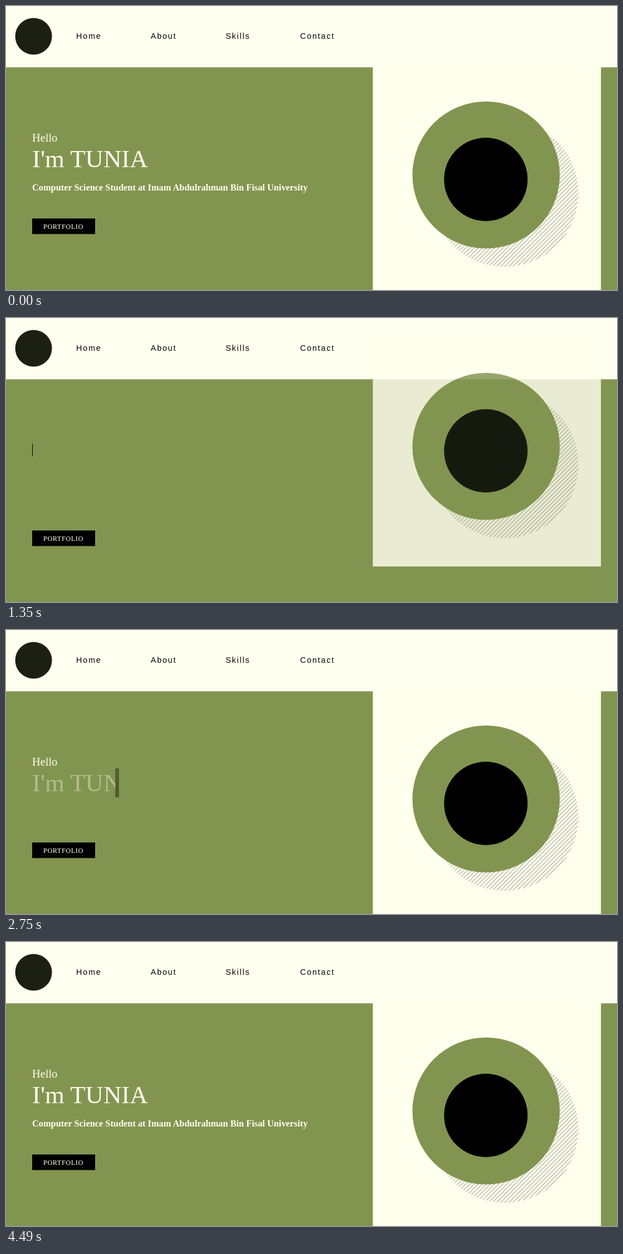
An HTML page for the animation above (5.22 s loop, 1097 by 511 pixels).

```html
<!DOCTYPE html>
<html lang="en">
<head>
<meta charset="utf-8">
<title>Portfolio</title>
<style>
  html, body { margin: 0; width: 100%; height: 100%; overflow: hidden; background: #829550; }
  svg { display: block; width: 100%; height: 100%; }
  .nav { font: 14.4px "Liberation Sans", Arial, sans-serif; letter-spacing: 1.8px; }
  .serif { font-family: "Liberation Serif", "Times New Roman", serif; fill: #fffff0; }
  .button { font-size: 12.4px; letter-spacing: .5px; }
  .bold { font-weight: bold; }
</style>
</head>
<body>
<svg viewBox="0 0 1097 511" preserveAspectRatio="none">
  <defs>
    <pattern id="hatch" width="5.2" height="5.2" patternUnits="userSpaceOnUse" patternTransform="rotate(-45)">
      <path d="M0 2.6H5.2" stroke="#808175" stroke-width=".8"/>
    </pattern>
  </defs>
  <rect width="1097" height="511" fill="#829550"/>
  <rect width="1097" height="110.3" fill="#fffff0"/>
  <circle cx="49.5" cy="54.5" r="33" fill="#1b2013"/>
  <g class="nav">
    <text x="126" y="59">Home</text>
    <text x="259.8" y="59">About</text>
    <text x="394.2" y="59">Skills</text>
    <text x="528" y="59">Contact</text>
  </g>
  <g id="lines"></g>
  <rect x="47" y="382.3" width="113" height="28" fill="#000"/>
  <text class="serif button" x="67" y="400.5">PORTFOLIO</text>
  <g id="panel">
    <rect x="658.6" y="110" width="409.6" height="410" fill="#ffffee"/>
    <circle cx="895.5" cy="337" r="132.3" fill="url(#hatch)"/>
    <circle cx="862" cy="304" r="132.3" fill="#829550"/>
    <circle cx="861.5" cy="312" r="75" fill="#000"/>
  </g>
</svg>
<script>
const LOOP = 5220, RELOAD = 810, LEFT = 47;
const SLIDE = 1050, TYPING = 1000;   // length of the panel's slide and of each typed line
const PANEL_START = 806, PANEL_HEIGHT = 410;

const lines = [
  { text: "Hello", size: 20.4, y: 244, top: 226, height: 23, start: 1331, thin: true },
  { text: "I'm TUNIA", size: 44.8, y: 290, top: 249, height: 52, start: 2365 },
  { text: "Computer Science Student at Imam Abdulrahman Bin Fisal University",
    size: 16.35, y: 332, top: 317, height: 19, start: 3425, bold: true }
];

const clamp = v => Math.max(0, Math.min(1, v));

function add(parent, tag, attrs) {
  const el = document.createElementNS("http://www.w3.org/2000/svg", tag);
  for (const key in attrs) el.setAttribute(key, attrs[key]);
  return parent.appendChild(el);
}

// The CSS "ease" curve, solved by bisection.
function ease(x) {
  let lo = 0, hi = 1;
  const bezier = (a, b, s) => 3 * a * s * (1 - s) ** 2 + 3 * b * s * s * (1 - s) + s ** 3;
  for (let i = 0; i < 24; i++) {
    const mid = (lo + hi) / 2;
    if (bezier(.25, .25, mid) < x) lo = mid; else hi = mid;
  }
  return bezier(.1, 1, lo);
}

const panel = document.getElementById("panel");
const holder = document.getElementById("lines");

lines.forEach((line, i) => {
  const clip = add(holder, "clipPath", { id: "clip" + i });
  line.window = add(clip, "rect", { x: LEFT - 1, y: line.top, height: line.height });
  line.group = add(holder, "g", {});
  const text = add(line.group, "text", {
    class: line.bold ? "serif bold" : "serif", x: LEFT, y: line.y,
    "font-size": line.size, "clip-path": `url(#clip${i})`
  });
  text.textContent = line.text;
  line.width = text.getComputedTextLength() + .3;
  line.caret = add(line.group, "rect", { y: line.top, height: line.height });
});

function drawLine(line, time) {
  const u = time < RELOAD ? 1 : (time - line.start) / TYPING;
  const p = clamp(u);
  const shown = line.width * Math.min(1, Math.floor(p * 40) / 20);
  const caret = line.thin ? 1 : Math.min(shown, line.size * .39 * p);
  const left = Math.max(LEFT, LEFT + shown - caret);
  line.group.setAttribute("opacity", u < 0 ? 0 : line.thin ? 1 : p);
  line.window.setAttribute("width", shown + 1);
  line.caret.setAttribute("x", line.thin ? Math.round(left) : left);
  line.caret.setAttribute("width", u < 1 ? caret : 0);
}

// The screen refreshes in steps of about 70 ms.
function stepped(t) {
  if (t < RELOAD) return 0;
  if (t < 940) return RELOAD;
  return 935 + 69.6 * Math.min(51, Math.floor((t - 930) / 69.6));
}

function draw(t) {
  const time = stepped(t);
  const p = time < RELOAD ? 1 : time === RELOAD ? 0 : ease(clamp((time - PANEL_START) / SLIDE));
  panel.setAttribute("opacity", p);
  panel.setAttribute("transform", `translate(0 ${(p - 1) * PANEL_HEIGHT})`);
  lines.forEach(line => drawLine(line, time));
}

const begin = performance.now();
function tick() {
  draw((performance.now() - begin) % LOOP);
  requestAnimationFrame(tick);
}
tick();
</script>
</body>
</html>
```
